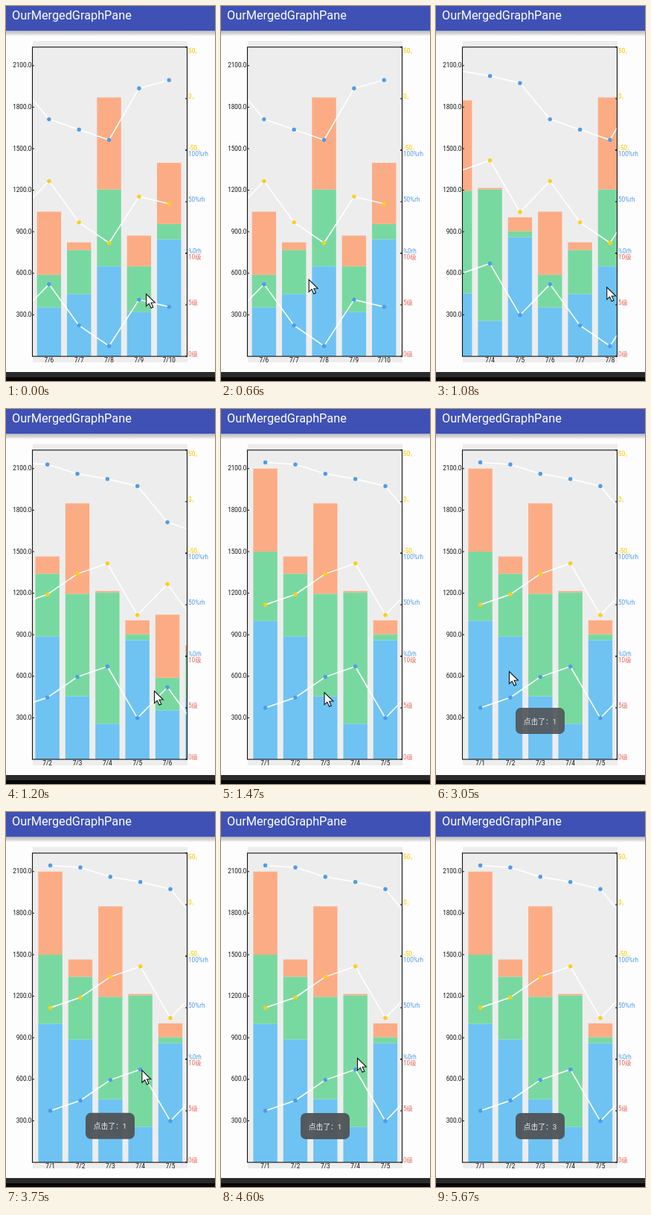
An HTML page with a canvas that plays this animation: 281x502 px, repeating every 6.67 s.

```html
<!DOCTYPE html>
<html lang="zh-CN">
<head>
<meta charset="utf-8">
<title>Combined chart</title>
<style>
html, body { margin: 0; width: 100%; height: 100%; overflow: hidden; background: #fdfdfd; }
canvas { display: block; width: 281px; height: 502px; }
</style>
</head>
<body>
<canvas id="stage" width="281" height="502"></canvas>
<script>
const ctx = document.getElementById('stage').getContext('2d');
const LOOP = 6670, STEP = 135;
const FONT = 'Roboto, "Noto Sans CJK SC", "Noto Sans CJK", sans-serif';
const BLUE = '#4f9bea', YELLOW = '#fccf1a', RED = '#e4695c', INK = '#111';
const LEFT = 36, RIGHT = 243, TOP = 55, BASE = 469;
const BAND = (BASE - TOP) / 3;
const PITCH = 40.35, BAR = 32.4, FIRST = 59.6, LAST_PAGE = 203.5;
const barColors = ['#6ec3f3', '#78d9a0', '#fcac84'];

// One entry per day
const rain = [
  [1000, 500, 600], [888, 453, 124], [456, 740, 653], [257, 949, 10], [861, 43, 100],
  [354, 235, 456], [451, 318, 54], [651, 555, 664], [322, 329, 221], [845, 111, 442]
];
const temperature = [38, 36, 27, 22, 15, -20, -30, -40, 10, 18];
const wind = [5, 6, 8, 9, 4, 7, 3, 1, 5.5, 4.8];
const humidity = wind.map(w => w * 10);

// Each axis fills one third of the plot height
const axes = [
  { data: temperature, min: -50, max: 50, dot: BLUE, ink: YELLOW, labels: ['50。', '0。', '-50。'] },
  { data: humidity, min: 0, max: 100, dot: YELLOW, ink: BLUE, labels: ['100%rh', '50%rh', '%0rh'] },
  { data: wind, min: 0, max: 10, dot: BLUE, ink: RED, labels: ['10级', '5级', '0级'] }
];

// Time, x, y
const path = [
  [135, 188.5, 385.5], [405, 94, 366], [675, 118.2, 366.4], [945, 260, 375.5],
  [1485, 139, 379.5], [1755, 105.5, 380], [2025, 95, 364], [2160, 95, 351.5],
  [2915, 95, 351.5], [3050, 98.5, 351.5], [3590, 182.5, 354], [4000, 183.5, 329.5],
  [5275, 183.5, 329.5], [5680, 207, 520]
];

const clamp = u => Math.max(0, Math.min(1, u));
const rainY = v => BASE - v * 55.6 / 300;

// Time is held in even steps, counted anew from each burst of movement
function hold(t) {
  const start = [4600, 2915, 0].find(s => t + 16 >= s);
  return start + Math.floor((t + 16 - start) / STEP) * STEP;
}

function pointerAt(t) {
  const next = path.findIndex(p => p[0] > t);
  if (next <= 0) return path.at(next).slice(1);
  const [t0, x0, y0] = path[next - 1], [t1, x1, y1] = path[next];
  const u = (t - t0) / (t1 - t0);
  return [x0 + (x1 - x0) * u, y0 + (y1 - y0) * u];
}

const scrollAt = t => LAST_PAGE * (1 - clamp((t - 945) / 540)) ** 2.2;

function rect(color, x, y, w, h) {
  ctx.fillStyle = color;
  ctx.fillRect(x, y, w, h);
}

function text(str, x, y, color, size, align = 'left', weight = 400) {
  ctx.font = `${weight} ${size}px ${FONT}`;
  ctx.textAlign = align;
  ctx.fillStyle = color;
  ctx.fillText(str, x, y);
}

function drawFrame() {
  rect('#fdfdfd', 0, 0, 281, 502);
  rect('#3f51b5', 0, 0, 281, 33.5);
  const shade = ctx.createLinearGradient(0, 33.5, 0, 40.5);
  shade.addColorStop(0, '#bcbcc0');
  shade.addColorStop(0.5, '#d6d6d6');
  shade.addColorStop(1, '#fdfdfd');
  rect(shade, 0, 33.5, 281, 7);
  text('OurMergedGraphPane', 8, 17.5, '#fff', 16.3);
  rect('#ededed', 36, 47, 208, 430);
  rect('#2a2a2a', 0, 490, 281, 7);
  rect('#060606', 0, 497, 281, 5);
}

function drawAxes() {
  ctx.strokeStyle = INK;
  ctx.lineWidth = 1.1;
  ctx.strokeRect(LEFT - 0.5, TOP, RIGHT - LEFT + 1, BASE - TOP);
  for (let v = 300; v <= 2100; v += 300) {
    const y = rainY(v);
    text(v.toFixed(1), 34.3, y + 2.6, INK, 8.2, 'right');
    rect(INK, LEFT, y - 0.5, 2, 1);
  }
  axes.forEach(({ ink, labels }, k) => {
    const top = TOP + BAND * k;
    labels.forEach((label, i) => {
      const y = top + BAND / 2 * i;
      text(label, 245, i ? y : y + 8.3, ink, 8.2, 'left', ink === YELLOW ? 500 : 400);
      rect(INK, 241, y - 0.5, 3, 1);
    });
  });
}

function drawLine(xs, { data, min, max, dot }, k) {
  const bottom = TOP + BAND * (k + 1);
  const points = data.map((v, i) => [xs[i], bottom - (v - min) / (max - min) * BAND]);
  ctx.beginPath();
  points.forEach(p => ctx.lineTo(...p));
  ctx.strokeStyle = '#fff';
  ctx.lineWidth = 1.6;
  ctx.stroke();
  ctx.fillStyle = dot;
  for (const [x, y] of points) {
    ctx.beginPath();
    ctx.arc(x, y, 2.7, 0, Math.PI * 2);
    ctx.fill();
  }
}

function drawData(shift) {
  const xs = rain.map((_, i) => FIRST + PITCH * i - shift);
  ctx.save();
  ctx.beginPath();
  ctx.rect(LEFT, TOP, RIGHT - LEFT, BASE - TOP);
  ctx.clip();
  rain.forEach((parts, i) => {
    let sum = 0;
    parts.forEach((v, k) => {
      const y = rainY(sum += v);
      rect(barColors[k], xs[i] - BAR / 2, y, BAR, rainY(sum - v) - y);
    });
  });
  axes.forEach((axis, k) => drawLine(xs, axis, k));
  ctx.restore();
  xs.forEach((x, i) => {
    if (x > LEFT && x < RIGHT) text(`7/${i + 1}`, x, 477.3, INK, 8.2, 'center');
  });
}

// Springs up into place while fading in
function drawToast(age, n) {
  const y = 403 + 36 * Math.exp(-0.00645 * age) * Math.cos(0.01047 * age);
  ctx.save();
  ctx.globalAlpha = Math.min(0.95, 0.2 + age / 250);
  ctx.fillStyle = '#505457';
  ctx.beginPath();
  ctx.roundRect(107, y, 66, 35, 7);
  ctx.fill();
  text(`点击了：${n}`, 140, y + 21.6, '#f4f4f4', 9.8, 'center');
  ctx.restore();
}

function drawPointer([x, y]) {
  ctx.save();
  ctx.translate(x, y);
  ctx.fillStyle = '#fff';
  ctx.strokeStyle = INK;
  ctx.lineWidth = 1.1;
  const arrow = new Path2D('M0 0V16.3L3.8 12.8 6.6 18.8 9.3 17.6 6.6 11.8 11.8 11.6Z');
  ctx.fill(arrow);
  ctx.stroke(arrow);
  ctx.restore();
}

const start = performance.now();
function tick() {
  const t = hold((performance.now() - start) % LOOP);
  drawFrame();
  drawData(scrollAt(t));
  drawAxes();
  if (t >= 4735) drawToast(t - 4735, 3);
  else if (t >= 2875) drawToast(t - 2875, 1);
  drawPointer(pointerAt(t));
  requestAnimationFrame(tick);
}
tick();
</script>
</body>
</html>
```
